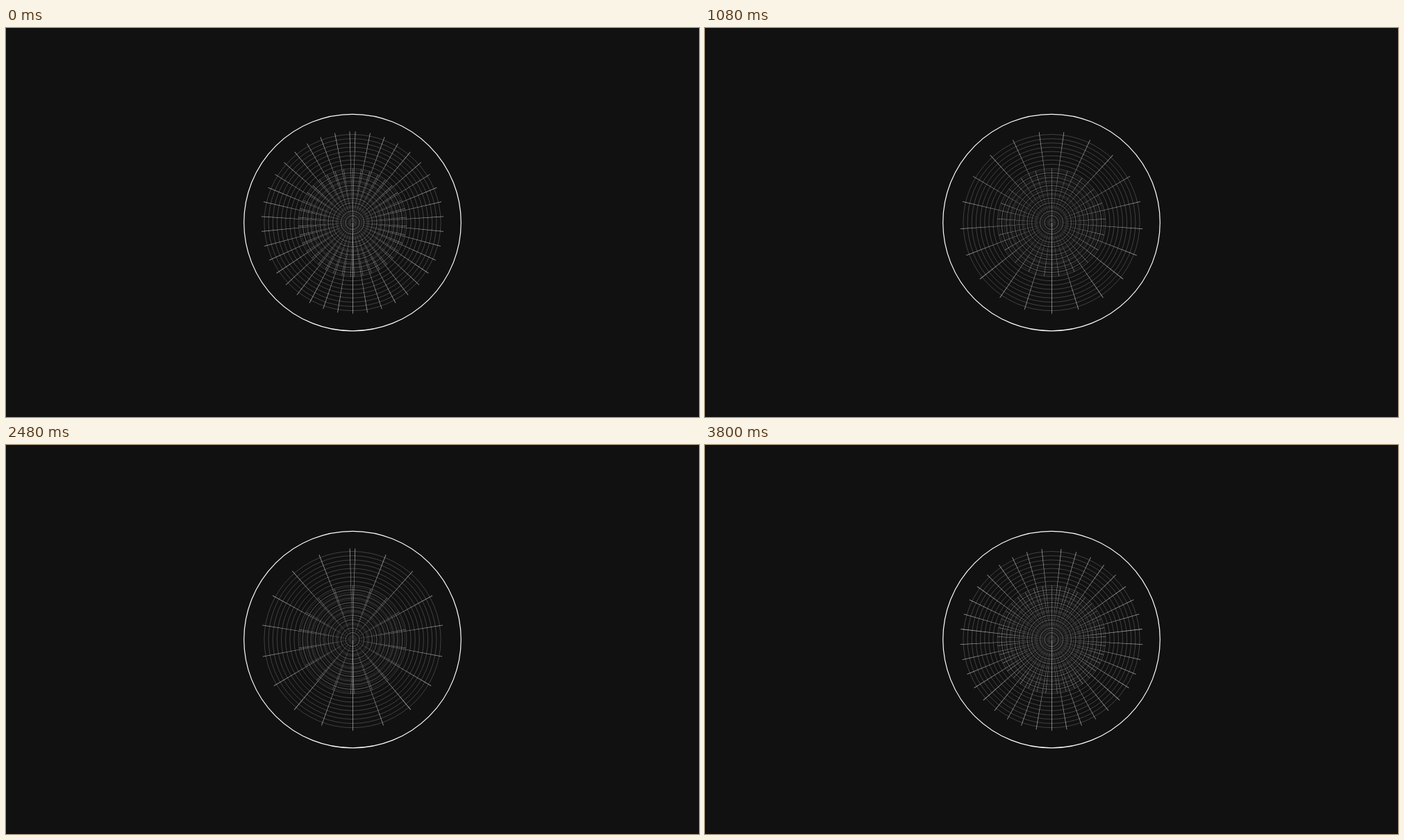
An HTML page with a canvas that plays this animation: 998 px wide and 561 px high, repeating every 3840 ms.

```html
<!DOCTYPE html>
<html lang="en">
<head>
<meta charset="utf-8">
<title>Polar grids</title>
<style>
  html, body { margin: 0; width: 100%; height: 100%; overflow: hidden; background: #111; }
  canvas { display: block; }
</style>
</head>
<body>
<canvas id="stage" width="998" height="561"></canvas>
<script>
const ctx = document.getElementById('stage').getContext('2d');
const LOOP = 3840, PEAK = 1920, END = 3800;
const CX = 499, CY = 280.6;
const SPOKE = 131.5, RING = 127.1, GAP = 6.15;

const smooth = u => u * u * (3 - 2 * u);
const mix = (a, b, u) => a + (b - a) * smooth(Math.min(1, u));

// Angle between neighbouring spokes, in degrees
function stepAt(t) {
  return t < PEAK
    ? mix(9.38, 22.58, t / PEAK)
    : mix(22.58, 9.66, (t - PEAK) / (END - PEAK));
}

function ring(r, width, color) {
  ctx.beginPath();
  ctx.arc(CX, CY, r, 0, Math.PI * 2);
  ctx.lineWidth = width;
  ctx.strokeStyle = color;
  ctx.stroke();
}

// Spokes taper to the centre; angles count from the bottom (dir 1) or top (dir -1)
function spoke(deg, r, half, dir) {
  const a = deg * Math.PI / 180;
  const s = Math.sin(a), c = Math.cos(a) * dir;
  ctx.beginPath();
  ctx.moveTo(CX, CY);
  ctx.lineTo(CX + s * r - c * half, CY + c * r + s * half);
  ctx.lineTo(CX + s * r + c * half, CY + c * r - s * half);
  ctx.fill();
}

function grid(scale, step, dir) {
  for (let r = RING; r > 0; r -= GAP) {
    ring(r * scale, 0.5 * scale, 'rgba(255,255,255,.4)');
  }
  const reach = SPOKE * scale, half = 0.4 * scale;
  ctx.fillStyle = 'rgba(255,255,255,.6)';
  // The seam of the grid keeps its width all the way in
  ctx.fillRect(CX, CY, 0.8 * scale, reach * dir);
  for (let a = step; a <= 180; a += step) {
    spoke(a, reach, half, dir);
    spoke(-a, reach, half, dir);
  }
}

function draw(t) {
  const step = stepAt(t);
  ctx.fillStyle = '#111';
  ctx.fillRect(0, 0, 998, 561);
  grid(1, step, 1);
  grid(0.594, step, -1);
  ring(156.3, 1.2, '#fff');
}

function frame(now) {
  draw(now % LOOP);
  requestAnimationFrame(frame);
}
draw(0);
requestAnimationFrame(frame);
</script>
</body>
</html>
```
